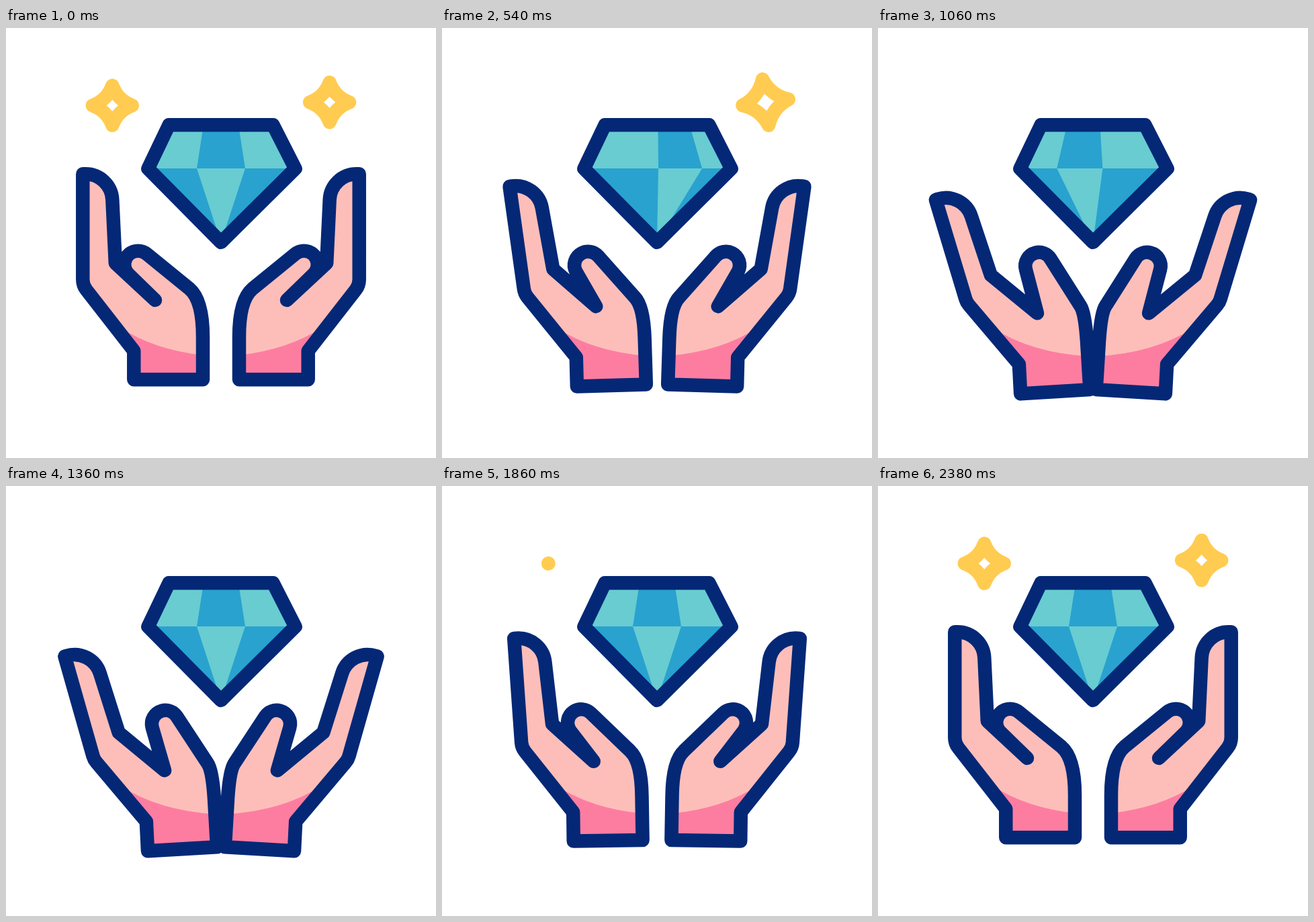
These frames come from a looping animation (640x640 px, 2.4 s). An HTML page with a canvas:

```html
<!DOCTYPE html>
<html lang="en">
<head>
<meta charset="utf-8">
<title>Diamond in hands</title>
<style>
html, body { margin: 0; width: 100%; height: 100%; overflow: hidden; background: #fff; }
canvas { display: block; width: 100vmin; height: 100vmin; }
</style>
</head>
<body>
<canvas id="stage" width="640" height="640"></canvas>
<script>
const ctx = document.getElementById('stage').getContext('2d');
const LOOP = 2400;
const NAVY = '#042876', SKIN = '#fdbeb9', PINK = '#fd7da1';
const TEAL = '#68ccd1', BLUE = '#29a2cf', GOLD = '#ffcc51';

const lerp = (a, b, p) => a + (b - a) * p;
const radians = degrees => degrees * Math.PI / 180;

// Eased progress of t between two times
function ease(t, from, to) {
  const u = Math.min(1, Math.max(0, (t - from) / (to - from)));
  return u * u * (3 - 2 * u);
}

function polygon(...points) {
  ctx.beginPath();
  points.forEach(([x, y]) => ctx.lineTo(x, y));
  ctx.closePath();
}

function fillPolygon(color, ...points) {
  polygon(...points);
  ctx.fillStyle = color;
  ctx.fill();
}

// Left hand: each joint drifts by (dx, dy) as the hand opens from 0 to 1
function handPath(open) {
  const at = (x, y, dx, dy) => [x + dx * open, y + dy * open];
  const tip = at(114.3, 217.3, -28.6, 38.6);
  const fingerBase = at(162.8, 350, 5.2, 18);
  const [thumbX, thumbY] = at(196.5, 352, 43.3, 2.2);
  const path = new Path2D();

  path.moveTo(...at(293, 523.3, 22.5, 14.9));
  path.lineTo(...at(190.3, 523.3, 22, 21.2));
  path.lineTo(...at(190.3, 480.5, 19.7, 20));
  path.arcTo(...at(114.3, 383, 17.7, 25.6), ...tip, 25);
  path.lineTo(...tip);
  path.arcTo(...at(156.5, 217.3, -30.3, 25.5), ...fingerBase, 40);
  path.lineTo(...fingerBase);
  path.lineTo(...at(222, 405, 15, 19.5));
  path.arc(thumbX, thumbY, 20.3, radians(lerp(140, 166, open)), radians(lerp(310, 327, open)));
  path.lineTo(...at(273, 388, 28.5, 26));
  path.quadraticCurveTo(...at(293, 405, 15, 19), ...at(293, 460, 18, 5));
  path.closePath();
  return path;
}

function drawHand(path) {
  ctx.save();
  ctx.clip(path);
  ctx.fillStyle = SKIN;
  ctx.fillRect(60, 180, 280, 400);
  ctx.beginPath();
  ctx.moveTo(170, 446);
  ctx.quadraticCurveTo(230, 485, 320, 489);
  ctx.lineTo(320, 570);
  ctx.lineTo(170, 570);
  ctx.fillStyle = PINK;
  ctx.fill();
  ctx.restore();
  ctx.strokeStyle = NAVY;
  ctx.stroke(path);
}

function drawHands(t) {
  const path = handPath(ease(t, 0, 1110) - ease(t, 1220, 2170));
  drawHand(path);
  ctx.save();
  ctx.translate(640, 0);
  ctx.scale(-1, 1);
  drawHand(path);
  ctx.restore();
}

// The middle facet swings right, left and back, narrowing on the way out
function drawGem(t) {
  const swing = ease(t, 0, 400) - 2 * ease(t, 400, 800) + ease(t, 800, 1185);
  const edge = (side, scale) => 320 + scale * (80.5 * swing + side * (36 - 8 * Math.abs(swing)));
  const top = 154, girdle = 209, topScale = 0.764;
  const left = [edge(-1, 1), girdle], right = [edge(1, 1), girdle];
  const gem = () => polygon([242.5, 144.3], [397.5, 144.3], [430.6, 209.3], [320, 319], [209.4 + 2, 209.3]);

  ctx.save();
  gem();
  ctx.clip();
  ctx.fillStyle = TEAL;
  ctx.fillRect(200, 140, 240, girdle - 140);
  ctx.fillStyle = BLUE;
  ctx.fillRect(200, girdle, 240, 120);
  fillPolygon(BLUE, [edge(-1, topScale), top], [edge(1, topScale), top], right, left);
  fillPolygon(TEAL, left, right, [320, 319]);
  ctx.restore();

  gem();
  ctx.strokeStyle = NAVY;
  ctx.stroke();
}

// The star swells and spins away, later spins back in the same way
function drawStar(x, y, t, leave, enter) {
  let size, turn;
  if (t < LOOP / 2) {
    size = lerp(1, 1.4, ease(t, leave, leave + 295));
    size *= 1 - ease(t, leave + 295, leave + 435);
    turn = 90 * ease(t, leave, leave + 403);
  } else {
    size = 1.4 * ease(t, enter + 148, enter + 360);
    size -= 0.4 * ease(t, enter + 360, enter + 600);
    turn = 90 * ease(t, enter, enter + 600);
  }
  if (size <= 0.001) return;

  const tip = 29.5 * size, waist = 7.85 * size;
  ctx.save();
  ctx.translate(x, y);
  ctx.rotate(radians(turn));
  ctx.beginPath();
  ctx.moveTo(0, -tip);
  for (let i = 0; i < 4; i++) {
    ctx.quadraticCurveTo(waist, -waist, tip, 0);
    ctx.rotate(Math.PI / 2);
  }
  ctx.closePath();
  ctx.strokeStyle = GOLD;
  ctx.stroke();
  ctx.restore();
}

function draw() {
  const t = performance.now() % LOOP;
  ctx.fillStyle = '#fff';
  ctx.fillRect(0, 0, 640, 640);
  ctx.lineWidth = 20.5;
  ctx.lineJoin = ctx.lineCap = 'round';
  drawStar(158.3, 115.3, t, 90, 1704);
  drawStar(481.6, 110.6, t, 210, 1794);
  drawHands(t);
  drawGem(t);
  requestAnimationFrame(draw);
}
draw();
</script>
</body>
</html>
```
